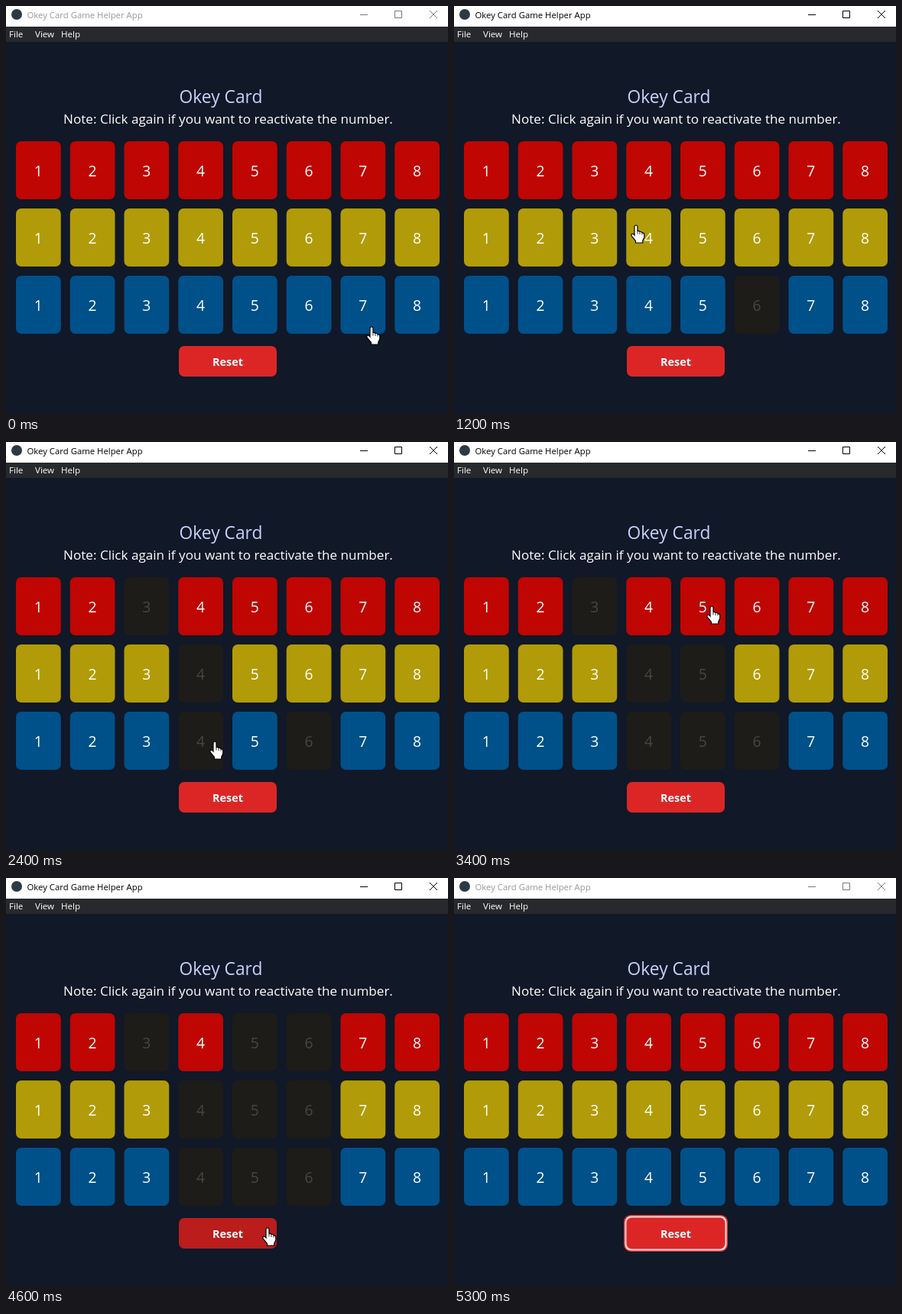
An HTML page with a canvas that plays this animation: 578x534 px, repeating every 5400 ms.

```html
<!DOCTYPE html>
<html lang="en">
<head>
<meta charset="utf-8">
<title>Okey Card Game Helper App</title>
<style>
html, body { margin: 0; width: 100%; height: 100%; overflow: hidden; background: #111827; }
canvas { display: block; }
</style>
</head>
<body>
<canvas width="578" height="534"></canvas>
<script>
const ctx = document.querySelector('canvas').getContext('2d');
const LOOP = 5400, STEP = 100;
const ROW_COLORS = ['#bf0603', '#b19b08', '#00508a'];
const CARD = { x: 13, y: 177, w: 58.75, h: 76, gap: 12 };
const RESET = { x: 226, y: 445, w: 128, h: 40 };

// Where the pointer presses: time, x, y. The first stop is its start, the last its exit.
const STOPS = [
  [0, 478, 420], [400, 409, 381], [1700, 164, 246], [2000, 262, 310],
  [2300, 273, 392], [2700, 335, 385], [3100, 337, 305], [3500, 337, 215],
  [3800, 405, 220], [4200, 402, 310], [4700, 342, 458], [5200, 332, 482]
];
const PRESSES = STOPS.slice(1, -1);
const FOCUS_AT = PRESSES[0][0], RESET_AT = PRESSES.at(-1)[0], BLUR_AT = STOPS.at(-1)[0];

const HAND = new Path2D(`M-2 1.5 Q-1.8 0 0 0 Q1.8 0 2 1.5 V7.5 Q4 6.8 5 8.4
  Q7 7.8 8 9.6 Q10.5 9.4 10.8 12 V16 L8.8 20 V23 H-.5 V20.5
  L-5.5 14.5 Q-7 12 -5 11 Q-3.5 11 -2 13 Z`);
const KNUCKLES = new Path2D('M2 8 V11.5 M5 8.6 V12 M8 10 V12.5');
const CONTROLS = new Path2D('M463 11.5 h10 M508.5 6.5 h9 v9 h-9 Z M554 6 l10 10 M564 6 l-10 10');

function box(x, y, w, h, r, color) {
  ctx.fillStyle = color;
  ctx.beginPath();
  ctx.roundRect(x, y, w, h, r);
  ctx.fill();
}

function text(str, x, y, size, color, align = 'left', weight = 400) {
  ctx.font = `${weight} ${size}px "Open Sans", "Noto Sans", sans-serif`;
  ctx.textAlign = align;
  ctx.fillStyle = color;
  ctx.fillText(str, x, y);
}

const inside = (x, y, r) => x > r.x && x < r.x + r.w && y > r.y && y < r.y + r.h;

// Rests one step around each press and eases between stops
function pointerAt(t) {
  const i = STOPS.findIndex(stop => stop[0] > t);
  const [t0, x0, y0] = STOPS[i - 1], [t1, x1, y1] = STOPS[i];
  const k = Math.min(1, Math.max(0, (t - t0 - STEP) / (t1 - t0 - 2 * STEP)));
  const e = k * k * (3 - 2 * k);
  return [x0 + (x1 - x0) * e, y0 + (y1 - y0) * e];
}

function drawWindow(active) {
  box(0, 0, 578, 534, 0, '#111827');
  box(0, 0, 578, 27, 0, '#fff');
  box(0, 27, 578, 20, 0, '#28292c');
  box(7, 4, 14, 14, 7, '#2c3a43');
  text('Okey Card Game Helper App', 27.5, 16, 11.35, active ? '#000' : '#999');
  ctx.strokeStyle = active ? '#000' : '#777';
  ctx.lineWidth = 1;
  ctx.stroke(CONTROLS);
  ['File', 'View', 'Help'].forEach((item, i) => text(item, 4 + i * 34, 41, 11.6, '#fff'));
  text('Okey Card', 281, 127, 22.8, '#c7d2fe', 'center');
  text('Note: Click again if you want to reactivate the number.', 290.5, 154, 17.1, '#fff', 'center');
}

function drawCards(t) {
  const pressed = t < RESET_AT ? PRESSES.filter(press => press[0] <= t) : [];
  ROW_COLORS.forEach((color, row) => {
    for (let n = 1; n <= 8; n++) {
      const x = CARD.x + (n - 1) * (CARD.w + CARD.gap);
      const y = CARD.y + row * (CARD.h + CARD.gap);
      const off = pressed.some(([, px, py]) => inside(px, py, { ...CARD, x, y }));
      box(x, y, CARD.w, CARD.h, 7, off ? '#1e1c19' : color);
      text(n, x + CARD.w / 2, y + 46, 19.3, off ? '#464646' : '#fff', 'center', 500);
    }
  });
}

function drawReset(focused, hovered) {
  const { x, y, w, h } = RESET;
  const grown = (d, r, color) => box(x - d, y - d, w + 2 * d, h + 2 * d, r, color);
  if (focused) {
    grown(4, 9, '#dc3535');
    grown(2.5, 8, '#f6dada');
  }
  grown(focused ? 0.5 : 0, 7, hovered ? '#bb1c1c' : '#dc2626');
  text('Reset', 290, 471, 14.4, '#fff', 'center', 700);
}

function drawHand(x, y) {
  ctx.save();
  ctx.translate(Math.round(x), Math.round(y));
  ctx.fillStyle = '#fff';
  ctx.strokeStyle = '#000';
  ctx.lineWidth = 1.2;
  ctx.fill(HAND);
  ctx.stroke(HAND);
  ctx.lineWidth = 0.8;
  ctx.stroke(KNUCKLES);
  ctx.restore();
}

function frame() {
  const t = Math.floor(performance.now() % LOOP / STEP) * STEP;
  const present = t < BLUR_AT;
  const [x, y] = present ? pointerAt(t) : [0, 0];
  drawWindow(present && t >= FOCUS_AT);
  drawCards(t);
  drawReset(t >= RESET_AT, inside(x, y, RESET));
  if (present) drawHand(x, y);
  requestAnimationFrame(frame);
}
frame();
</script>
</body>
</html>
```
